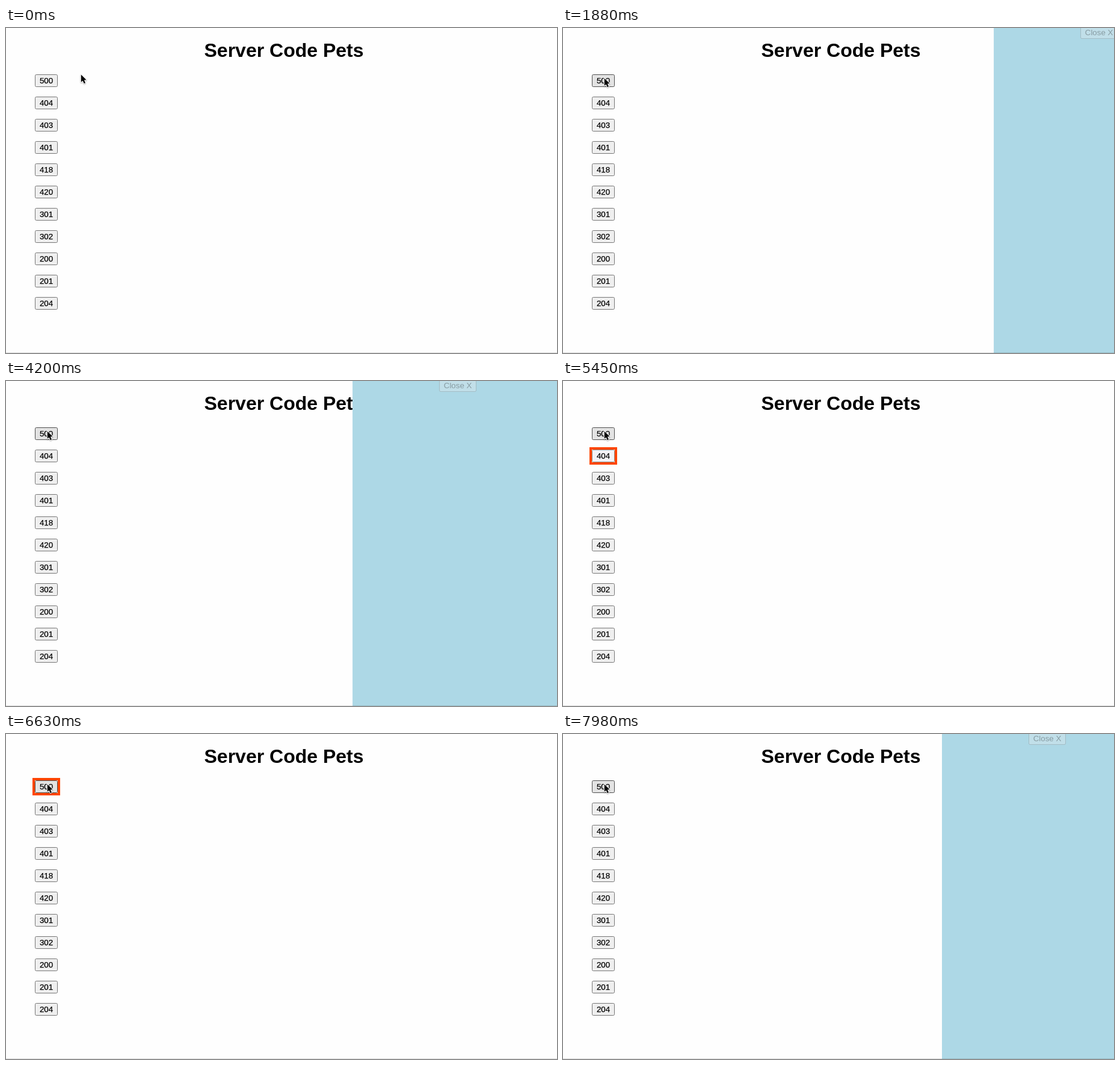
These frames come from a looping animation (916x540 px, 8000 ms). An HTML page with a canvas:

```html
<!DOCTYPE html>
<html lang="en">
<head>
<meta charset="utf-8">
<title>Server Code Pets</title>
<style>
html, body { margin: 0; width: 916px; height: 540px; overflow: hidden; background: #fefefe; }
canvas { display: block; }
</style>
</head>
<body>
<canvas id="stage" width="916" height="540"></canvas>
<script>
const ctx = document.getElementById('stage').getContext('2d');
const LOOP = 8000, PRESS = 110, STEP = 60;
const OPEN_X = 574, CLOSED_X = 924;
const SANS = '"Liberation Sans", Arial, sans-serif';
const SERIF = '"Liberation Serif", "Times New Roman", serif';
const CODES = [500, 404, 403, 401, 418, 420, 301, 302, 200, 201, 204];
const SLIDE = [0.006, 0.16, 0.406, 0.69, 0.91, 1];

const visits = [
  { item: 0, open: 450, close: 1640, end: 2180 },
  { item: 1, open: 3250, close: 4080, end: 4500 },
  { item: 1, open: 5450, close: 6280, end: 6630 },
  { item: 0, open: 7040, close: 7800, end: 8220 }
];
const tabs = [2840, 5040];

const slideAt = ms => ms < 0 ? 0 : SLIDE[Math.min(SLIDE.length - 1, Math.floor(ms / STEP))];

function random(seed) {
  return () => (seed = (seed * 16807) % 2147483647) / 2147483647;
}

function rect(x, y, w, h, color) {
  ctx.fillStyle = color;
  ctx.fillRect(x, y, w, h);
}

function text(str, x, y, font, color, weight = 0) {
  ctx.font = font;
  ctx.fillStyle = ctx.strokeStyle = color;
  ctx.textAlign = 'center';
  ctx.fillText(str, x, y);
  if (!weight) return;
  ctx.lineWidth = weight;
  ctx.strokeText(str, x, y);
}

function shape(points, color) {
  ctx.beginPath();
  points.forEach(([x, y]) => ctx.lineTo(x, y));
  ctx.closePath();
  ctx.fillStyle = color;
  ctx.fill();
}

function oval(x, y, rx, ry, color, turn = 0) {
  ctx.beginPath();
  ctx.ellipse(x, y, rx, ry, turn, 0, Math.PI * 2);
  ctx.fillStyle = color;
  ctx.fill();
}

const looks = {
  normal: ['#efefef', '#767676', '#000'],
  hover: ['#e3e3e3', '#4f4f4f', '#000'],
  active: ['#f3f3f8', '#8d8d8d', '#000'],
  disabled: ['rgba(239,239,239,.3)', 'rgba(118,118,118,.3)', 'rgba(16,16,16,.32)']
};

function button(label, x, y, w, look, focused) {
  const [fill, edge, ink] = looks[look];
  ctx.beginPath();
  ctx.roundRect(x + 0.5, y + 0.5, w - 1, 20, 2);
  ctx.fillStyle = fill;
  ctx.fill();
  ctx.strokeStyle = edge;
  ctx.lineWidth = 1;
  ctx.stroke();
  if (focused) {
    ctx.strokeStyle = '#ff4500';
    ctx.lineWidth = 4;
    ctx.strokeRect(x - 2, y - 2, w + 4, 25);
  }
  text(label, x + w / 2, y + 15, '13.333px ' + SANS, ink, look === 'disabled' ? 0 : 0.25);
}

// Photos are drawn in card coordinates, 300 by 240.
function paperPhoto() {
  const floor = ctx.createLinearGradient(0, 20, 0, 180);
  floor.addColorStop(0, '#a58a74');
  floor.addColorStop(1, '#b0937d');
  rect(30, 20, 240, 160, floor);
  const rnd = random(41);
  for (let i = 0; i < 1100; i++) {
    rect(30 + rnd() * 240, 20 + rnd() * 160, 1.5, 1.5,
      rnd() < 0.5 ? 'rgba(110,82,62,.25)' : 'rgba(215,190,168,.25)');
  }
  ctx.lineCap = 'round';
  ctx.strokeStyle = '#2b221b';
  ctx.lineWidth = 23;
  ctx.beginPath();
  ctx.moveTo(66, 119);
  ctx.quadraticCurveTo(90, 126, 130, 121);
  ctx.stroke();
  for (let i = 0; i < 46; i++) {
    oval(56 + rnd() * 70, 111 + rnd() * 20, 4, 2, rnd() < 0.6 ? '#191410' : '#4c3b29', rnd() * 3);
  }
  oval(165, 119, 48, 30, '#2b221b');
  oval(172, 124, 30, 16, '#4c3b29');
  shape([[95, 25], [190, 38], [232, 88], [160, 106], [106, 88], [53, 68], [68, 60]], '#c9c4bc');
  shape([[95, 25], [190, 38], [205, 84], [68, 60]], '#d5d1ca');
  shape([[68, 60], [53, 68], [106, 88], [118, 76]], '#dedad3');
}

function errorPhoto() {
  const room = ctx.createLinearGradient(30, 20, 270, 180);
  room.addColorStop(0, '#8b7b6c');
  room.addColorStop(1, '#544840');
  rect(30, 20, 240, 160, room);
  rect(30, 140, 240, 40, '#6b594b');
  oval(160, 132, 60, 38, '#a87d53');
  oval(128, 92, 31, 28, '#b88b5e');
  shape([[102, 82], [102, 48], [124, 67]], '#a87d53');
  shape([[134, 67], [154, 48], [155, 83]], '#a87d53');
  oval(128, 104, 15, 10, '#dac3a2');
  oval(117, 89, 4, 4, '#2c261e');
  oval(139, 89, 4, 4, '#2c261e');
}

const cards = [
  { photo: errorPhoto, caption: 'Internal Server Error' },
  { photo: paperPhoto, caption: 'Not Found' }
];

function card(x, item) {
  ctx.save();
  ctx.translate(x, 86);
  rect(0, 0, 300, 240, '#000');
  ctx.strokeStyle = '#c4c4c4';
  ctx.lineWidth = 1;
  ctx.strokeRect(28.5, 18.5, 243, 163);
  ctx.save();
  ctx.beginPath();
  ctx.rect(30, 20, 240, 160);
  ctx.clip();
  cards[item].photo();
  ctx.restore();
  text(CODES[item], 150, 206, '30px ' + SERIF, '#fff');
  text(cards[item].caption, 150, 226, '14px ' + SERIF, '#fff');
  ctx.restore();
}

function panel(t, visit) {
  const closing = t >= visit.close + PRESS;
  const start = (closing ? visit.close : visit.open) + PRESS;
  const shift = (CLOSED_X - OPEN_X) * slideAt(t - start);
  const x = closing ? OPEN_X + shift : CLOSED_X - shift;
  if (x >= CLOSED_X) return;
  rect(x, 0, 350, 540, '#add8e6');
  const look = closing ? 'disabled' : t >= visit.close ? 'active' : 'normal';
  button('Close X', x + 144, -3, 62, look, !closing);
  if (!closing) card(x + 25, visit.item);
}

function cursor(x, y) {
  ctx.save();
  ctx.translate(x, y);
  ctx.beginPath();
  [[0.8, 1.5], [0.8, 14], [3.6, 11.4], [5.8, 16.2], [8, 15.2], [5.9, 10.5], [9.6, 10.2]]
    .forEach(([px, py]) => ctx.lineTo(px, py));
  ctx.closePath();
  ctx.lineJoin = 'round';
  ctx.shadowColor = 'rgba(0,0,0,.3)';
  ctx.shadowBlur = 2;
  ctx.shadowOffsetY = 1;
  ctx.strokeStyle = '#fff';
  ctx.lineWidth = 2;
  ctx.stroke();
  ctx.shadowColor = 'transparent';
  ctx.fillStyle = '#000';
  ctx.fill();
  ctx.restore();
}

function focusedItem(t, visit) {
  if (visit) return t < visit.open + PRESS && visit !== visits[0] ? visit.item : -1;
  const last = visits.filter(v => v.end <= t).pop();
  if (!last) return -1;
  return tabs.some(tab => tab >= last.end && tab <= t) ? 1 : 0;
}

function draw(t) {
  const visit = visits.find(v => t >= v.open && t < v.end);
  const focus = focusedItem(t, visit);
  const pressed = visit && t < visit.open + PRESS ? visit.item : -1;

  // The pointer advances once per tick before the first press.
  const ticks = t < 110 ? 0 : Math.min(5, 1 + Math.floor((t - 110) / STEP));
  const move = (1 - Math.cos(Math.PI * ticks / 5)) / 2;
  const mouseX = 124 - 56 * move, mouseY = 76 + 6 * move;

  rect(0, 0, 916, 540, '#fefefe');
  text('Server Code Pets', 462, 48, 'bold 32px ' + SANS, '#000');
  CODES.forEach((code, i) => {
    const look = i === pressed ? 'active' : i === 0 && mouseX < 86 ? 'hover' : 'normal';
    button(code, 48, 77 + 37 * i, 38, look, i === focus);
  });
  if (visit && t >= visit.open + PRESS) panel(t, visit);
  rect(0, 539, 916, 1, 'rgba(0,0,0,.13)');
  cursor(mouseX, mouseY);
}

function frame() {
  draw(performance.now() % LOOP);
  requestAnimationFrame(frame);
}
frame();
</script>
</body>
</html>
```
